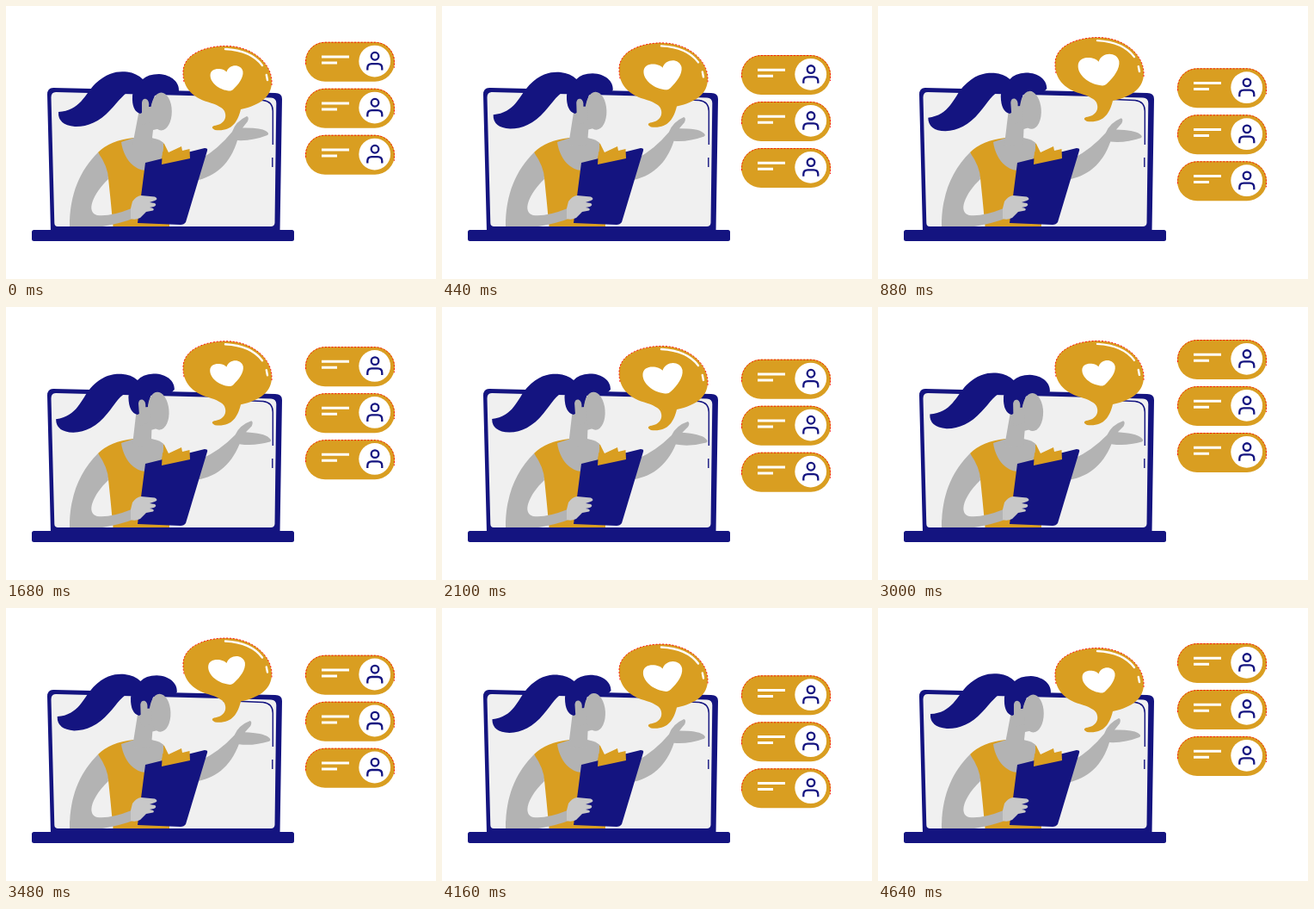
These frames come from a looping animation (500x317 px, 4.66 s). An HTML page:

```html
<!DOCTYPE html>
<html lang="en">
<head>
<meta charset="utf-8">
<style>
  html, body { margin: 0; width: 100%; height: 100%; overflow: hidden; background: #fff; }
  svg { display: block; width: 100%; height: 100%; }
  .navy { fill: #141480; }
  .gold { fill: #d99e21; }
  .skin { fill: #b3b3b3; }
  .line { fill: none; stroke: #141480; }
  .white { fill: none; stroke: #fff; }
  .rim { fill: none; stroke: #f00; stroke-width: .9; stroke-dasharray: 2 1.8; }
</style>
</head>
<body>
<svg viewBox="0 0 500 317">
  <defs>
    <g id="pill">
      <rect class="gold" x="348" width="104" height="46" rx="23"/>
      <path class="rim" d="M348.500 26V23A22.500 22.500 0 0 1 371 .5H429A22.500 22.500 0 0 1 451.500 23V30"/>
      <path class="white" stroke-width="3" d="M367 17.200H399M367 24.200H385"/>
      <circle cx="428.700" cy="22.300" r="18.400" fill="#fff"/>
      <g class="line" stroke-width="2.300">
        <circle cx="429" cy="16.500" r="4.300"/>
        <path d="M420.300 32.800v-2.500q0-5 5-5h7q5 0 5 5v2.500"/>
      </g>
    </g>
  </defs>

  <!-- laptop -->
  <path class="navy" d="M55 95L313 101Q321 101 321 108L318.500 262H52L48 103Q48 95 55 95Z"/>
  <path fill="#f0f0f0" d="M58 100L308 106.500Q314.500 107 314.300 113L312.500 252Q312 256 308 256H60Q56.500 256 56.300 252L52.500 106Q52.500 100 58 100Z"/>
  <path class="line" stroke-width="1.400" d="M252 107.500L299 109.500Q310.300 111 310.300 122V161M309.800 176V187"/>
  <rect class="navy" x="30" y="260" width="305" height="13" rx="2.500"/>

  <!-- woman -->
  <path id="arm" class="skin" d="M220 203C244 198 261 183 269 156Q286 157 304 150Q307 148 302 145Q296 141 275 141.500L281 134Q283 129 280 128Q267 134 263 146Q247 166 226 178Z"/>
  <path class="gold" d="M107 170Q121 156 148 153L168 154Q181 156 184 160L190 172V256H124.500Q122 228 119 200Z"/>
  <path class="skin" d="M134 158L149 153H169Q180 155 183 159C184 178 176 191 164 191C149 191 137 178 134 158Z"/>
  <path class="skin" d="M107 170C86 191 74 218 74 256H112Q135 252 150 246L146 235Q121 245 106 243C92 239 102 217 119 201Q119 187 107 170Z"/>
  <g id="head">
    <path class="skin" d="M157 110L147 162H169L171 144L180 142V108Z"/>
    <path class="navy" d="M61 123C86 122 92 102 104 90C119 76 131 75.500 141 76.500Q152 78 159 85Q165 79 178 79C193 80 202 89 201 99Q196 105 186 102L173 104L168 119L156 125Q146 122 147 104L148 98C138 99 131 111 121 121C108 135 94 140.500 80 140Q60 138 61 123Z"/>
    <ellipse class="skin" cx="180.500" cy="122.500" rx="12.300" ry="22"/>
    <path class="skin" d="M158 126V112Q159 107 163 108Q167 110 166 117H171V135L158 138Z"/>
  </g>
  <path class="navy" d="M162 182L231 165Q235 165 234 168L209 251Q207 254 203 254L153 252Z"/>
  <path class="gold" d="M181 184L182 169L188 173L189 170L204 163L205 168L213.500 166L214 177Z"/>
  <path fill="#c8c8c8" d="M145 235L147 227Q151 221 157 220L173 221.500Q178 224 173 226L167 228L173 229Q176 231 172 233L167 234Q174 235 171 237.500L163 239L156 246Q150 249 145 247Z"/>

  <!-- speech bubble -->
  <g id="bubble">
    <path class="gold" d="M206 78C205 56 232 46 257 46.500C287 47 309 67 309 88C309 105 296 115 273 120C269 136 262 146 243 144Q237 141 242 139C252 138 258 131 254 122C252 118 245 114.500 235 111.500C216 106 206 94 206 78Z"/>
    <path class="rim" d="M207 88Q206 83 206 78C205 56 232 46 257 46.500C287 47 309 67 309 88V93"/>
    <path class="white" stroke-width="2.400" stroke-linecap="round" d="M255 50Q285 51.500 298 69M302.800 80L304 86"/>
    <path id="heart" fill="#fff" d="M0-7.500C-3-12-19-14-19-3.500C-19 5-9 13 1 14.200C4 15 6 14.500 8 12.500C14 7 20-1 19-8C17-17 3-17 0-7.500Z"/>
  </g>

  <g id="list"></g>
</svg>
<script>
const LOOP = 4660, STEP = 54, TOP = 41.7;
const el = id => document.getElementById(id);
const move = (id, value) => el(id).setAttribute('transform', value);
const clamp = x => Math.max(0, Math.min(1, x));

el('list').innerHTML = '<use href="#pill"/>'.repeat(4);
const pills = [...el('list').children];

// head tilt in degrees, evenly spaced over the loop
const tilts = [0, -1.6, -4, -3.3, -4, -4.8, -3, -1.3, -1, -1.9, -4.2, -3.3];

function spline(keys, u) {
  const n = keys.length, i = Math.floor(u * n), f = u * n - i;
  const [a, b, c, d] = [-1, 0, 1, 2].map(k => keys[(i + k + n) % n]);
  return b + f / 2 * (c - a + f * (2 * a - 5 * b + 4 * c - d + f * (3 * (b - c) + d - a)));
}

function draw(now) {
  const u = now % LOOP / LOOP;
  const wave = cycles => Math.cos(2 * Math.PI * cycles * u);

  move('head', `rotate(${spline(tilts, u)} 155 165)`);
  const reach = ((1 - wave(1)) / 2 + Math.sin(Math.PI * u)) / 2;
  move('arm', `rotate(${6.5 * reach} 238 183)`);
  move('bubble', `translate(0 ${5.75 * (wave(2) - 1)})`);
  move('heart', `translate(256.5 84) scale(${(43.6 - 5.2 * wave(3)) / 38.5})`);

  // the list scrolls one step per cycle, fading at both ends
  const shift = u * 3 % 1 * STEP;
  pills.forEach((pill, i) => {
    const y = TOP + (i - 1) * STEP + shift;
    pill.setAttribute('y', y);
    pill.setAttribute('opacity', clamp(Math.min((y - 30) / 6, (197 - y) / 4)));
  });
}

const start = performance.now();
(function tick() {
  draw(performance.now() - start);
  requestAnimationFrame(tick);
})();
</script>
</body>
</html>
```
